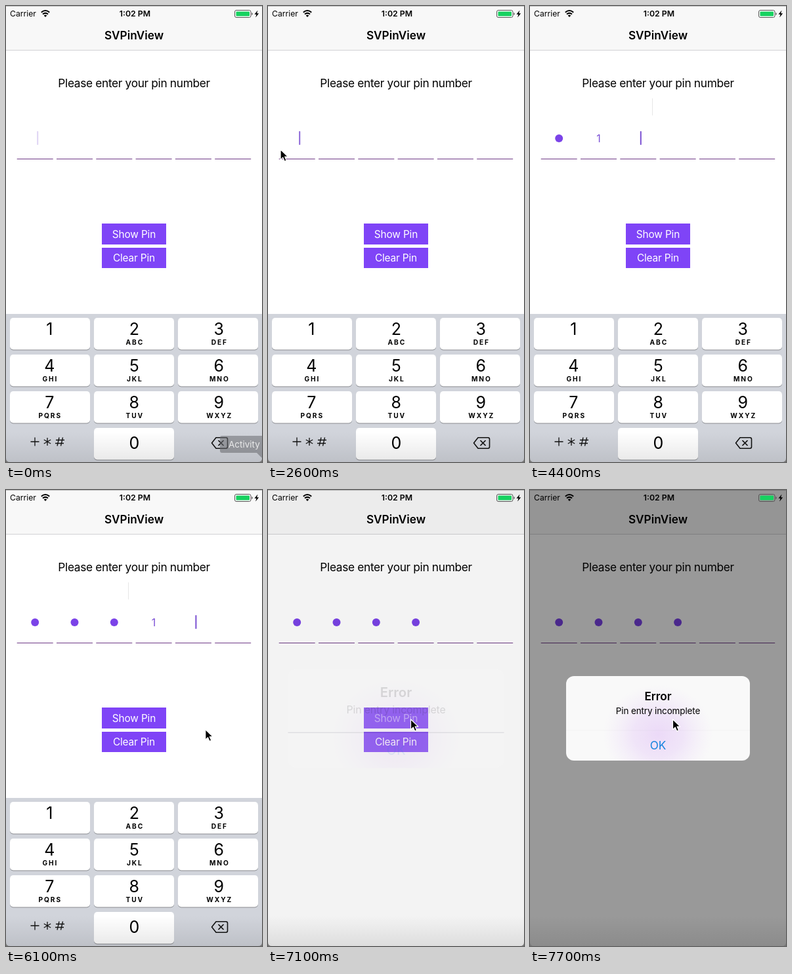
Write an HTML page that moves like this. It is 390x696 px and loops after 8 s.

```html
<!DOCTYPE html>
<html lang="en">
<head>
<meta charset="utf-8">
<title>SVPinView</title>
<style>
  html, body { margin: 0; width: 100%; height: 100%; overflow: hidden; background: #fff; }
  svg { display: block; width: 390px; height: 696px; font-family: Inter, Roboto, "Open Sans", sans-serif; }
  .mid { text-anchor: middle; }
</style>
</head>
<body>
<svg viewBox="0 0 390 696">
  <defs>
    <radialGradient id="glow">
      <stop offset="0" stop-color="#d9aef5"/>
      <stop offset=".45" stop-color="#dcb8f6" stop-opacity=".75"/>
      <stop offset="1" stop-color="#e6d0f8" stop-opacity="0"/>
    </radialGradient>
    <linearGradient id="foot" x2="0" y2="1">
      <stop offset="0" stop-opacity="0"/>
      <stop offset="1" stop-opacity=".09"/>
    </linearGradient>
    <clipPath id="frame"><rect x="55" y="284" width="280" height="129" rx="12"/></clipPath>
  </defs>

  <rect width="390" height="696" fill="#fff"/>
  <rect width="390" height="67" fill="#f8f8f8"/>
  <rect y="67" width="390" height="1" fill="#d2d2d4"/>
  <text class="mid" x="195" y="51" font-size="17.2" font-weight="600">SVPinView</text>
  <text class="mid" x="195" y="124" font-size="17.3" letter-spacing="-.32">Please enter your pin number</text>

  <g id="cells"></g>
  <rect id="caret" y="191" width="2" height="21" rx=".8" fill="#7a50d2"/>
  <rect id="trace" x="186" y="141" width="1" height="26" fill="#e6e6e6"/>

  <g fill="#7f44f7">
    <rect x="146" y="332" width="98" height="32"/>
    <rect x="146" y="369" width="98" height="31"/>
  </g>
  <g class="mid" fill="#fff" font-size="15.4" letter-spacing="-.15">
    <text id="show" x="195" y="354">Show Pin</text>
    <text x="195" y="390">Clear Pin</text>
  </g>

  <g id="keyboard">
    <rect y="470" width="390" height="226" fill="#d1d4db"/>
    <g id="keys"></g>
    <g fill="none" stroke="#111" stroke-width="1.3">
      <path d="M37.500 665h13M44 658.500v13"/>
      <path d="M63 659v12M57.800 662l10.400 6M57.800 668l10.400-6"/>
      <path d="M81 658.500l-3 13M86.500 658.500l-3 13M76 662.500h13M75 667.500h13"/>
      <path stroke-width="1.6" stroke-linejoin="round"
        d="M320 658.800h15q2.500 0 2.500 2.500v11.500q0 2.500-2.500 2.500h-15l-6.500-8.250z"/>
      <path stroke-width="1.7" d="M323.500 663l8 8M331.500 663l-8 8"/>
    </g>
  </g>

  <g id="activity">
    <path d="M329 656H390V690L382 682H329Q326 682 326 679V659Q326 656 329 656Z" fill="#6c6e74" fill-opacity=".55"/>
    <text x="339" y="674" font-size="13.5" fill="#fff" fill-opacity=".88">Activity</text>
  </g>

  <rect id="dim" width="390" height="696"/>

  <text x="6" y="16" font-size="12.2">Carrier</text>
  <text class="mid" x="196.5" y="16" font-size="12.3" font-weight="600">1:02 PM</text>
  <path d="M53.800 9.700q6.200-5.400 12.400 0M56 12.500q4-3.400 8 0" fill="none" stroke="#000" stroke-width="2.1"/>
  <path d="M57.700 14.400q2.300-1.700 4.600 0L60 17z"/>
  <rect x="348.5" y="6.5" width="24.5" height="11" rx="2.5" fill="none" stroke="#555"/>
  <rect x="350.5" y="8.5" width="20.5" height="7" rx="1" fill="#16d260"/>
  <path d="M374.300 10v4q1.500-.5 1.500-2t-1.500-2z" fill="#555"/>
  <path d="M383.500 6.500l-5 6.200h3l-1.300 4.800 5-6.200h-3z"/>

  <g id="alert">
    <g id="card" clip-path="url(#frame)">
      <rect x="55" y="284" width="280" height="129" fill="#f9f9f9"/>
      <ellipse id="halo" cx="195" cy="373" rx="84" ry="76" fill="url(#glow)"/>
      <rect id="rule" x="55" y="366.5" width="280" height="1" fill="#4b4a66"/>
    </g>
    <g id="message" class="mid">
      <text x="195" y="321" font-size="17.2" font-weight="600">Error</text>
      <text x="195" y="342" font-size="13.5" letter-spacing="-.13">Pin entry incomplete</text>
      <text x="195" y="396" font-size="17.2" fill="#1583de">OK</text>
    </g>
  </g>

  <rect y="650" width="390" height="46" fill="url(#foot)"/>
  <rect width="390" height="1" fill-opacity=".22"/>
  <path d="M0 690v6h6q-6 0-6-6zM390 690v6h-6q6 0 6-6z" fill="#777"/>

  <path id="pointer" d="M0 0V15.600L3.700 12.200L6.200 18L9 16.800L6.600 11.100H11.400Z"
    stroke="#fff" stroke-width="1.2" stroke-linejoin="round"/>
</svg>

<script>
const LOOP = 8000, STEP = 100, PITCH = 60.3;
const FIRST_KEY = 3600, KEY_GAP = 700, DIGITS = 4, SUBMIT = 6900;
const $ = id => document.getElementById(id);
const set = (id, name, value) => $(id).setAttribute(name, value);
const clamp = (v, lo, hi) => Math.min(hi, Math.max(lo, v));
const part = (t, from, to) => clamp((t - from) / (to - from), 0, 1);
const smooth = k => k * k * (3 - 2 * k);

function add(parent, tag, attrs, text) {
  const el = document.createElementNS("http://www.w3.org/2000/svg", tag);
  for (const k in attrs) el.setAttribute(k, attrs[k]);
  if (text) el.textContent = text;
  return parent.appendChild(el);
}

function addKey(col, row, digit, sub) {
  const g = $("keys"), x = 6 + col * 128, y = 476 + row * 56, mid = 66.3 + col * 129;
  const box = { x, width: 122, height: 48.5, rx: 5 };
  add(g, "rect", { ...box, y: y + 1, fill: "#898b90" });
  add(g, "rect", { ...box, y, fill: "#fff" });
  add(g, "text", { x: mid, y: y + (row < 3 ? 26 : 32), class: "mid", "font-size": 25 }, digit);
  add(g, "text", { x: mid + 1, y: y + 41, class: "mid", "font-size": 10.2,
    "font-weight": 700, "letter-spacing": 1.9 }, sub);
}
["", "ABC", "DEF", "GHI", "JKL", "MNO", "PQRS", "TUV", "WXYZ"]
  .forEach((sub, i) => addKey(i % 3, Math.floor(i / 3), String(i + 1), sub));
addKey(1, 3, "0", "");

const cells = Array.from({ length: 6 }, (_, i) => {
  const g = $("cells"), x = 44.2 + i * PITCH;
  add(g, "rect", { x: x - 27.5, y: 233, width: 55, height: 1, fill: "#6f3a86" });
  return {
    digit: add(g, "text", { x, y: 208, class: "mid", "font-size": 16, fill: "#7d52d6" }, "1"),
    dot: add(g, "circle", { cx: x, cy: 202, r: 6, fill: "#7b43e8" })
  };
});

// Fades in, holds, fades out, rests; each key press returns it to the hold.
function caretAlpha(t, count) {
  if (t >= SUBMIT) return 0;
  const since = t - FIRST_KEY - (count - 1) * KEY_GAP;
  const u = count ? Math.max(300, since - 100) : (t + 550) % 1000;
  return u < 400 ? 1 - (1 - part(u, 0, 300)) ** 3 : (1 - part(u, 400, 700)) ** 2;
}

const glides = [
  { start: 1800, end: 2200, until: 2700, from: [250, 330], to: [19, 219] },
  { start: 2700, end: 3400, until: FIRST_KEY, from: [19, 219], to: [11, 136] },
  { start: 5900, end: 6500, until: LOOP, from: [334, 371], to: [217.5, 350] }
];

function drawPointer(t) {
  const g = glides.find(g => t >= g.start && t < g.until);
  set("pointer", "opacity", g ? 1 : 0);
  if (!g) return;
  const k = smooth(part(t, g.start, g.end));
  set("pointer", "transform", `translate(${g.from.map((v, i) => v + (g.to[i] - v) * k)})`);
}

function drawAlert(t) {
  const p = 1 - Math.exp(-((Math.max(0, t - 7050) / 142) ** 2)), left = 1 - p;
  set("dim", "opacity", .4 * p);
  set("alert", "transform", `translate(195 348.5) scale(${1 + .2 * left}) translate(-195 -348.5)`);
  set("card", "opacity", 1 - left * left);
  set("message", "opacity", p);
  set("halo", "opacity", .42 + .3 * left);
  set("rule", "opacity", .03 + .75 * left);
}

function draw(t) {
  const count = clamp(Math.floor((t - FIRST_KEY) / KEY_GAP) + 1, 0, DIGITS);
  cells.forEach((c, i) => {
    const open = i === count - 1 && t < SUBMIT;
    c.digit.setAttribute("opacity", open ? 1 : 0);
    c.dot.setAttribute("opacity", i < count && !open ? 1 : 0);
  });
  set("caret", "x", 47.2 + count * PITCH);
  set("caret", "opacity", caretAlpha(t, count));
  set("trace", "opacity", t >= 3400 && t < SUBMIT ? 1 : 0);
  set("show", "opacity", t >= SUBMIT ? .5 : 1);
  set("activity", "opacity", 1 - part(t, 0, 200));
  set("keyboard", "transform", `translate(0 ${226 * smooth(part(t, 6850, 7100))})`);
  drawAlert(t);
  drawPointer(t);
}

const start = performance.now();
function tick() {
  const t = (performance.now() - start) % LOOP;
  draw(Math.floor(t / STEP) * STEP);
  requestAnimationFrame(tick);
}
tick();
</script>
</body>
</html>
```
